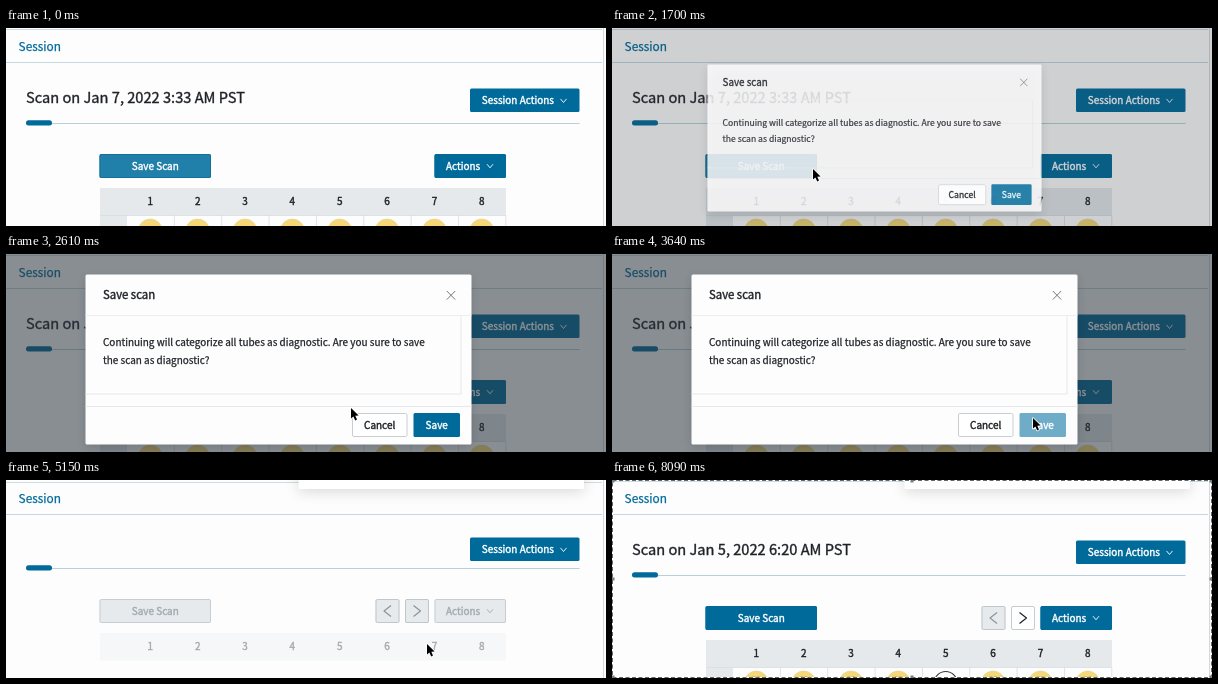
An HTML page with a canvas that plays this animation: 600 by 198 pixels, repeating every 8.12 s.

```html
<!DOCTYPE html>
<html lang="en">
<head>
<meta charset="utf-8">
<title>Save scan</title>
<style>
  html, body { margin: 0; width: 100%; height: 100%; overflow: hidden; background: #fff; }
  canvas { display: block; width: 600px; height: 198px; }
</style>
</head>
<body>
<canvas id="stage"></canvas>
<script>
const W = 600, H = 198, LOOP = 8120;
const FAMILY = '"Noto Sans CJK JP", "Noto Sans CJK SC", "Noto Sans CJK KR", "Noto Sans CJK", "Open Sans", sans-serif';
const BASE = 9.96;
const PRIMARY = [0, 107, 155], HOVER = [32, 128, 170], OFF = [230, 234, 236];
const INK = [30, 34, 38], MUTED = [163, 171, 176], WHITE = [255, 255, 255];

// Moments of the story, in ms
const T = { mask: 1580, open: 1628, hover: 3060, busy: 3480, close: 4400, reload: 4520,
            toast: 4950, loaded: 5890, frame: 6300, gone: 6670 };

// Pointer path: time, x, y
const PATH = [
  [0, 207, 216], [250, 207, 216], [1200, 198, 139], [1500, 198, 139], [1640, 201, 141],
  [1900, 201, 141], [2610, 345, 154], [3150, 421, 164], [5900, 421, 164],
  [6400, 565, 177], [6500, 565, 177], [T.gone, 580, 212]
];

const canvas = document.getElementById('stage');
const ctx = canvas.getContext('2d');
const dpr = window.devicePixelRatio || 1;
canvas.width = W * dpr;
canvas.height = H * dpr;

const clamp = v => Math.max(0, Math.min(1, v));
const ramp = (t, from, span) => clamp((t - from) / span);
const lerp = (a, b, p) => a + (b - a) * p;
const smooth = p => p * p * (3 - 2 * p);
const mix = (a, b, p) => a.map((v, i) => lerp(v, b[i], p));
const css = c => Array.isArray(c) ? `rgb(${c.map(Math.round).join(',')})` : c;

function bezier(x1, y1, x2, y2) {
  const at = (a, b, u) => 3 * a * u * (1 - u) ** 2 + 3 * b * u * u * (1 - u) + u ** 3;
  return x => {
    if (x <= 0 || x >= 1) return clamp(x);
    let lo = 0, hi = 1;
    for (let i = 0; i < 24; i++) {
      const mid = (lo + hi) / 2;
      if (at(x1, x2, mid) < x) lo = mid; else hi = mid;
    }
    return at(y1, y2, lo);
  };
}
const easeOut = bezier(0.08, 0.82, 0.17, 1);
const easeInOut = bezier(0.78, 0.14, 0.15, 0.86);

function fill(color, x, y, w, h) {
  ctx.fillStyle = css(color);
  ctx.fillRect(x, y, w, h);
}

// A hairline outline thickens the glyphs; 'bold' is its width in pixels.
function text(str, x, y, color, size = BASE, bold = 0.25, align = 'left') {
  ctx.font = `400 ${size}px ${FAMILY}`;
  ctx.textAlign = align;
  ctx.fillStyle = ctx.strokeStyle = css(color);
  ctx.lineWidth = bold;
  ctx.lineJoin = 'round';
  ctx.fillText(str, x, y);
  ctx.strokeText(str, x, y);
}

const MEDIUM = 0.4;

function stroke(points, color, width = 1) {
  ctx.beginPath();
  points.forEach(([x, y], i) => i ? ctx.lineTo(x, y) : ctx.moveTo(x, y));
  ctx.strokeStyle = css(color);
  ctx.lineWidth = width;
  ctx.stroke();
}

function box(x, y, w, h, color, border) {
  ctx.beginPath();
  ctx.roundRect(x, y, w, h, 1.5);
  ctx.fillStyle = css(color);
  ctx.fill();
  if (!border) return;
  ctx.beginPath();
  ctx.roundRect(x + 0.5, y + 0.5, w - 1, h - 1, 1.5);
  ctx.strokeStyle = css(border);
  ctx.lineWidth = 1;
  ctx.stroke();
}

function chevronDown(x, y, color) {
  stroke([[x - 3, y - 1.8], [x, y + 1.8], [x + 3, y - 1.8]], color, 0.9);
}

function arrowButton(x, y, dir, on) {
  box(x, y, 24, 24, mix(OFF, WHITE, on), mix([190, 199, 204], [196, 205, 210], on));
  const cx = x + 12, cy = y + 12;
  stroke([[cx - 3.5 * dir, cy - 5.5], [cx + 3.5 * dir, cy], [cx - 3.5 * dir, cy + 5.5]],
         mix([140, 148, 153], INK, on), 1.2);
}

function table(y, live, after) {
  const left = 94, first = 121, pitch = 47.35;
  fill(mix([246, 247, 248], [229, 233, 236], live), left, y, 406, 27.5);
  for (let i = 0; i < 8; i++) {
    text(String(i + 1), 144.3 + pitch * i, y + 17.2, mix(MUTED, INK, live), BASE, MEDIUM, 'center');
  }
  if (!live) return;

  ctx.save();
  ctx.globalAlpha *= live;
  fill('#e5e9ec', left, y + 27, 27, H);
  for (let i = 0; i < 8; i++) {
    const cx = 144.3 + pitch * i, cy = y + 43;
    fill('#dde3e6', first + pitch * (i + 1) - 0.5, y + 27, 1, H);
    const blank = after && i === 4;
    ctx.beginPath();
    ctx.arc(cx, cy, blank ? 11.5 : 12, 0, 7);
    ctx.fillStyle = blank ? '#fff' : '#f5d777';
    ctx.fill();
    ctx.lineWidth = blank ? 1.2 : 0.7;
    ctx.strokeStyle = blank ? '#33383c' : '#e6d596';
    ctx.stroke();
    if (after && !blank) text('00', cx, cy - 1, '#c9a94a', 8, 0.2, 'center');
  }
  fill('#d5dde1', left, y + 27, 406, 0.7);
  ctx.restore();
}

function page(t) {
  const after = t >= T.loaded;
  const loading = t >= T.reload && !after;
  const up = loading ? 7 : 0;
  const live = after ? ramp(t, T.loaded, 250) : 1 - ramp(t, T.reload, 250);

  fill('#fefdfe', 0, 0, W, H);
  fill('#cbdce3', 0, loading ? 2 : 1, 596, 1);
  fill('#c3d8e1', 0, 34, 596, 1);
  fill('#d5d9db', 597, 0, 1, H);
  text('Session', 12.6, 23, PRIMARY, 11.85);

  if (!loading) {
    text(after ? 'Scan on Jan 5, 2022 6:20 AM PST' : 'Scan on Jan 7, 2022 3:33 AM PST',
         20, 74.6, INK, 14.63, 0.35);
  }

  const sy = loading ? 57.5 : 60.5;
  box(464, sy, 109.5, 23.5, PRIMARY);
  text('Session Actions', 475.8, sy + 15.8, WHITE, BASE, MEDIUM);
  chevronDown(557.5, sy + 12.2, WHITE);

  fill('#b5d0da', 20, 95 - up, 553.5, 1);
  ctx.beginPath();
  ctx.roundRect(20, 92.3 - up, 26, 5.2, 2.5);
  ctx.fillStyle = css(PRIMARY);
  ctx.fill();

  const by = 126 - up;
  const label = mix(MUTED, WHITE, live);
  const saveFill = mix(OFF, after ? PRIMARY : HOVER, live);
  const edge = [198, 206, 211];
  box(93.5, by, 111.5, 24, saveFill, mix(edge, after ? PRIMARY : [20, 112, 154], live));
  text('Save Scan', 149.3, by + 15.7, label, BASE, MEDIUM, 'center');
  if (loading || after) {
    arrowButton(369.5, by, -1, 0);
    arrowButton(399, by, 1, after ? live : 0);
  }
  box(428.5, by, 71.5, 24, mix(OFF, PRIMARY, live), mix(edge, PRIMARY, live));
  text('Actions', 440, by + 15.7, label, BASE, MEDIUM);
  chevronDown(484, by + 12, label);

  table(160 - up, live, after);
}

function mask(t) {
  const a = ramp(t, T.mask, 300) * (1 - ramp(t, T.close, 250));
  if (a) fill(`rgba(42,52,60,${0.55 * a})`, 0, 0, W, H);
}

function modal(t) {
  if (t < T.open || t > T.close + 200) return;
  const closing = t > T.close;
  const p = closing ? 1 - easeInOut(ramp(t, T.close, 200)) : easeOut(ramp(t, T.open, 300));
  const scale = lerp(0.2, 1, p);
  ctx.save();
  ctx.globalAlpha = p;
  ctx.translate(198, 139);
  ctx.scale(scale, scale);
  ctx.translate(-198, -139);

  ctx.save();
  ctx.shadowColor = 'rgba(0,0,0,.14)';
  ctx.shadowBlur = 10 * dpr;
  ctx.shadowOffsetY = 3 * dpr;
  box(79.5, 20.5, 386, 170, '#fefdfe');
  ctx.restore();

  text('Save scan', 97, 45.3, INK, 11.35, MEDIUM);
  stroke([[440.8, 37], [449.2, 45.6]], '#73797d', 1);
  stroke([[449.2, 37], [440.8, 45.6]], '#73797d', 1);
  fill('#eceef0', 79.5, 61, 386, 1);
  fill('#e4e8ea', 79.5, 139.5, 376, 1);
  fill('#e4e8ea', 454.5, 62, 1, 78);
  fill('#e6e9eb', 79.5, 152, 386, 1);
  text('Continuing will categorize all tubes as diagnostic. Are you sure to save', 97, 92.2, INK);
  text('the scan as diagnostic?', 97, 109.8, INK);

  box(346, 159, 55.5, 24, WHITE, '#c6ced3');
  text('Cancel', 373.7, 174.8, INK, BASE, MEDIUM, 'center');
  const tone = mix(PRIMARY, HOVER, ramp(t, T.hover, 200));
  const busy = 0.35 * ramp(t, T.busy, 120);
  box(407.5, 159, 46.5, 24, mix(tone, WHITE, busy));
  text('Save', 430.7, 174.8, WHITE, BASE, MEDIUM, 'center');
  ctx.restore();
}

function toast(t) {
  if (t < T.toast) return;
  const p = easeInOut(ramp(t, T.toast, 200));
  ctx.save();
  ctx.globalAlpha = p;
  ctx.shadowColor = 'rgba(0,0,0,.14)';
  ctx.shadowBlur = 14 * dpr;
  ctx.shadowOffsetY = 3 * dpr;
  box(292.5 + 300 * (1 - p), -40, 285.5, 49, '#fff');
  ctx.restore();
}

function selection(t) {
  if (t < T.frame) return;
  ctx.save();
  ctx.lineWidth = 1;
  ctx.strokeStyle = '#fff';
  ctx.strokeRect(0.5, 0.5, W - 1, H - 1);
  ctx.setLineDash([4, 2.5]);
  ctx.strokeStyle = '#62676a';
  ctx.strokeRect(0.5, 0.5, W - 1, H - 1);
  ctx.restore();
  for (const x of [0, 299, 598]) {
    for (const y of [0, 98, 196]) {
      if (x !== 299 || y !== 98) fill('#777c7f', x - 0.5, y - 0.5, 3, 3);
    }
  }
}

function pointerAt(t) {
  const i = PATH.findIndex(k => k[0] > t);
  const [t0, x0, y0] = PATH[i - 1], [t1, x1, y1] = PATH[i];
  const p = smooth((t - t0) / (t1 - t0));
  return [lerp(x0, x1, p), lerp(y0, y1, p)];
}

function arrow() {
  ctx.beginPath();
  ctx.moveTo(0, 0);
  for (const [x, y] of [[0, 10.6], [2.4, 8.4], [4.2, 12.4], [6, 11.6], [4.3, 7.7], [7.6, 7.5]]) {
    ctx.lineTo(x, y);
  }
  ctx.closePath();
  ctx.lineJoin = 'round';
  ctx.lineWidth = 1.6;
  ctx.strokeStyle = '#fff';
  ctx.stroke();
  ctx.fillStyle = '#000';
  ctx.fill();
}

function hand() {
  ctx.rotate(-0.12);
  ctx.beginPath();
  ctx.moveTo(-1, 12);
  ctx.lineTo(-5.4, 7.4);
  ctx.quadraticCurveTo(-5.4, 4.8, -2.8, 6.8);
  ctx.lineTo(-4, 2.5);
  for (let x = -4; x < 5; x += 2.4) {
    ctx.quadraticCurveTo(x + 1.2, x < 3 ? -0.8 : 1.2, x + 2.4, 2.5);
  }
  ctx.lineTo(5.8, 8);
  ctx.lineTo(4.4, 12);
  ctx.closePath();
  ctx.fillStyle = '#fff';
  ctx.fill();
  ctx.lineJoin = 'round';
  ctx.strokeStyle = '#111';
  ctx.lineWidth = 1.2;
  ctx.stroke();
  for (const x of [-1.6, 0.8, 3.2]) stroke([[x, 2.2], [x + 0.3, 6.6]], '#111', 1);
}

function pointer(t) {
  if (t >= T.gone) return;
  const [x, y] = pointerAt(t);
  ctx.save();
  ctx.translate(x, y);
  if (t < T.frame) {
    arrow();
  } else {
    ctx.translate(2, 0);
    hand();
  }
  ctx.restore();
}

function draw(now) {
  const t = now % LOOP;
  ctx.setTransform(dpr, 0, 0, dpr, 0, 0);
  page(t);
  mask(t);
  modal(t);
  toast(t);
  selection(t);
  pointer(t);
}

const start = performance.now();
function tick() {
  draw(performance.now() - start);
  requestAnimationFrame(tick);
}
tick();
</script>
</body>
</html>
```
